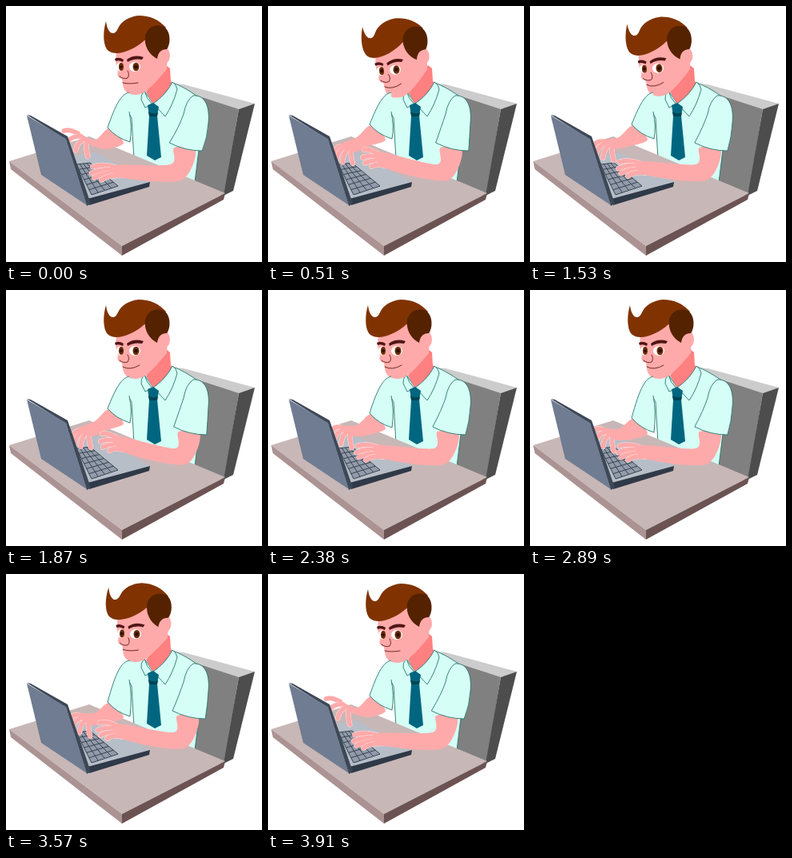
An HTML page that plays this animation: 320x320 px, repeating every 4.08 s.

```html
<!DOCTYPE html>
<html lang="en">
<head>
<meta charset="utf-8">
<title>Working at a laptop</title>
<style>
html, body { margin: 0; width: 100%; height: 100%; overflow: hidden; background: #fff; }
svg { display: block; width: 100vw; height: 100vh; }
.skin { fill: #faa; }
.shirt { fill: #d5fff6; stroke: #2a756a; stroke-width: .9; stroke-linejoin: round; }
.finger { fill: none; stroke: #faa; stroke-width: 5.6; stroke-linecap: round; }
.gap { fill: none; stroke: #ffe3e3; stroke-width: 6.5; stroke-linecap: round; }
.mark { fill: none; stroke: #5a2018; stroke-width: .9; stroke-linecap: round; }
.brow { fill: #501616; }
.iris { fill: #6a2c08; }
</style>
</head>
<body>
<svg viewBox="0 0 320 320">
  <g id="chair">
    <path fill="#808080" d="M214 102L291 128L273 238L225 225Z"/>
    <path fill="#ccc" d="M211 97L222 98L311 122L291 129L214 104Z"/>
    <path fill="#4d4d4d" d="M311 122L291 129L272 237L284 231Z"/>
  </g>

  <g id="torso">
    <path class="shirt" d="M173 106L153 109C144 113 151 130 157 140L160 192L236 220L241 180L238 112Q222 101 209 96L184 122Z"/>
    <path fill="#ff8080" d="M175 107L200 74L205 78L206 94L211 98L184 123Z"/>
    <path class="shirt" d="M173 106Q168 111 169 117L174 127L183 123Q175 115 173 106Z"/>
    <path class="shirt" d="M208 95Q213 98 214 104Q209 123 199 138L184 122Q200 111 208 95Z"/>
    <path fill="#006680" d="M177 124L184 121L191 126L189 137L194 189L186 193L176 187L179 137Z"/>
    <path fill="#004455" d="M178 132Q184 136 190 133L189 138H179Z"/>
  </g>

  <g id="head">
    <path class="skin" d="M139 50C137 62 136 72 140 82C138 87 141 90 145 91L146 98C147 107 153 111 162 111C172 111 181 103 201 79L203 44L170 34Z"/>
    <ellipse class="skin" cx="199" cy="62" rx="6" ry="9.5"/>
    <path fill="#803300" d="M125 19C121 32 121 50 128 56C138 64 160 55 173 43L184 40L200 27C191 17 180 12 166 12C154 13 144 19 140 28C136 38 127 36 125 19Z"/>
    <path fill="#520" d="M174 37C178 23 192 22 199 27C206 33 206 48 201 54C194 54 190 58 189 66C179 61 172 50 174 37Z"/>
    <path class="brow" d="M136 66Q141 63 147 67L146 70Q141 67 137 69Z"/>
    <path class="brow" d="M151 67Q160 60 172 64L170 67Q160 65 152 70Z"/>
    <ellipse cx="142.5" cy="76" rx="4.6" ry="5.4" fill="#fff"/>
    <ellipse cx="161" cy="76" rx="7" ry="6" fill="#fff"/>
    <ellipse class="iris" cx="144" cy="76" rx="3" ry="4.9"/>
    <ellipse class="iris" cx="162.5" cy="76" rx="4" ry="5.2"/>
    <circle cx="144" cy="76" r="1.8" fill="#2b1100"/>
    <circle cx="162.5" cy="76" r="2.3" fill="#2b1100"/>
    <path class="mark" d="M152 81Q155 86 152 90Q147 92 142 88"/>
    <path class="mark" id="mouth"/>
  </g>

  <g id="desk">
    <path fill="#c8b7b7" d="M4 194L104 163L274 234L145 300Z"/>
    <path fill="#ac9393" d="M4 194L145 300V312L6 204Z"/>
    <path fill="#6c5353" d="M145 300L274 234L272 242L145 312Z"/>
  </g>
  <g id="base">
    <path fill="#b7bec8" d="M70 190L112 183L180 220L103 242Z"/>
    <path fill="#2f3947" d="M102 241L180 220L179 226L104 249Z"/>
    <path id="keys" fill="#919baa" stroke="#39434f"/>
  </g>

  <g id="left"></g>
  <path class="shirt" id="leftSleeve"/>
  <g id="screen">
    <path fill="#3d4756" d="M26 136L31 137L77 163L106 247L101 250L75 167Z"/>
    <path fill="#6f7c91" d="M26 137L75 166L101 249L44 211Z"/>
  </g>
  <g id="right"></g>
  <path class="shirt" id="rightSleeve"/>
</svg>

<script>
const STEP = 170, LOOP = 4080, STEPS = LOOP / STEP;
const $ = id => document.getElementById(id);
const setPath = (id, d) => $(id).setAttribute("d", d);
const mix = (a, b, k) => a.map((v, i) => v + (b[i] - v) * k);
const ease = (from, to, v) => {
  const k = Math.min(1, Math.max(0, (v - from) / (to - from)));
  return k * k * (3 - 2 * k);
};

// upper: inner sleeve, inner elbow, outer elbow, outer sleeve
// low, high: both ends of the knuckles, first fingertip, last fingertip
const LEFT = {
  upper: [[129,149], [111,164], [126,175], [147,167]],
  low: [[88,175], [107,183], [84,186], [106,197]],
  high: [[88,165], [105,176], [78,170], [104,191]]
};
const RIGHT = {
  upper: [[213,177], [208,198], [221,218], [240,181]],
  low: [[134,200], [144,215], [108,202], [119,218]],
  high: [[136,181], [149,203], [121,179], [130,200]]
};

// Closed smooth curve through the points
function blob(pts) {
  const at = i => pts[(i + pts.length) % pts.length];
  const lean = (i, s) => at(i).map((v, k) => v + s * (at(i + 1)[k] - at(i - 1)[k]) / 7);
  return "M" + at(0) + pts.map((p, i) => "C" + [lean(i, 1), lean(i + 1, -1), at(i + 1)]).join("");
}

// Draws arm and fingers, returns the two sleeve points
function drawArm(id, arm, lift, move) {
  const [inner, elbowIn, elbowOut, outer] = arm.upper.map(move);
  const [top, bottom, first, last] = arm.low.map((p, i) => move(mix(p, arm.high[i], lift)));
  let svg = "";
  for (let i = 0; i < 4; i++) {
    const fan = Math.sin(Math.PI * i / 3);
    const root = mix(top, bottom, .12 + i * .24);
    const tip = mix(first, last, i / 3);
    tip[0] -= 6 * fan;
    tip[1] += 3 * fan;
    const bend = mix(root, tip, .55);
    const d = `M${root}Q${bend[0] - 2},${bend[1] - 4} ${tip}`;
    svg += `<path class="gap" d="${d}"/><path class="finger" d="${d}"/>`;
  }
  $(id).innerHTML = svg +
    `<path class="skin" d="${blob([inner, elbowIn, top, bottom, elbowOut, outer])}"/>`;
  return [inner, outer];
}

function drawKeys(cols, rows) {
  const a = [88,198], b = [105,196], c = [140,225], d = [107,236];
  let path = `M${a}L${b}L${c}L${d}Z`;
  for (let i = 1; i < cols; i++) path += `M${mix(a, b, i / cols)}L${mix(d, c, i / cols)}`;
  for (let i = 1; i < rows; i++) path += `M${mix(a, d, i / rows)}L${mix(b, c, i / rows)}`;
  setPath("keys", path);
}

function draw(n) {
  const lean = ease(0, 3, n) - ease(7, 11, n);
  const nod = ease(17, 20, n) - ease(21, 23, n);
  const smile = ease(0, 3, n) - ease(17, 22, n);
  $("head").setAttribute("transform", `translate(0 ${1.5 * lean}) rotate(${2.3 * nod - 5 * lean} 185 100)`);
  setPath("mouth", `M146 96Q${154 + smile},${98 + 3 * smile} ${165 + 2 * smile},${96 - 2 * smile}`);

  // The hands type in turn, three strokes each; the left one reaches higher around the loop's start
  const turn = 2 * Math.PI * (n + .5) / STEPS;
  const wave = .5 + .5 * Math.cos(3 * turn);
  const reach = Math.max(0, Math.cos(turn)) ** 8;
  const sag = 4 * (1 - ease(0, 3, n)) + 12 * ease(12, 16, n) - 8 * ease(21, 23, n);
  const sway = 6 * (.5 - wave);

  const [[lx, ly], [mx, my]] = drawArm("left", LEFT, wave + reach,
    ([x, y]) => [x, y + sag * ease(60, 130, x)]);
  setPath("leftSleeve",
    `M154 108C144 110 137 123 ${lx - 2},${ly - 1}Q${(lx + mx) / 2},${(ly + my) / 2 + 3} ${mx + 8},${my - 1}Q158 152 154 132`);

  const [[ix, iy], [ox, oy]] = drawArm("right", RIGHT, 1 - wave,
    ([x, y]) => [x + sway * ease(150, 220, x), y]);
  setPath("rightSleeve",
    `M234 112C249 111 255 126 253 146Q252 164 ${ox + 8},${oy}Q${(ix + ox) / 2},${oy} ${ix - 6},${iy - 6}Q217 150 222 135Q225 118 234 112`);
}

let last = -1;
function tick() {
  const n = Math.floor(performance.now() % LOOP / STEP);
  if (n !== last) draw(last = n);
  requestAnimationFrame(tick);
}
drawKeys(4, 6);
tick();
</script>
</body>
</html>
```
